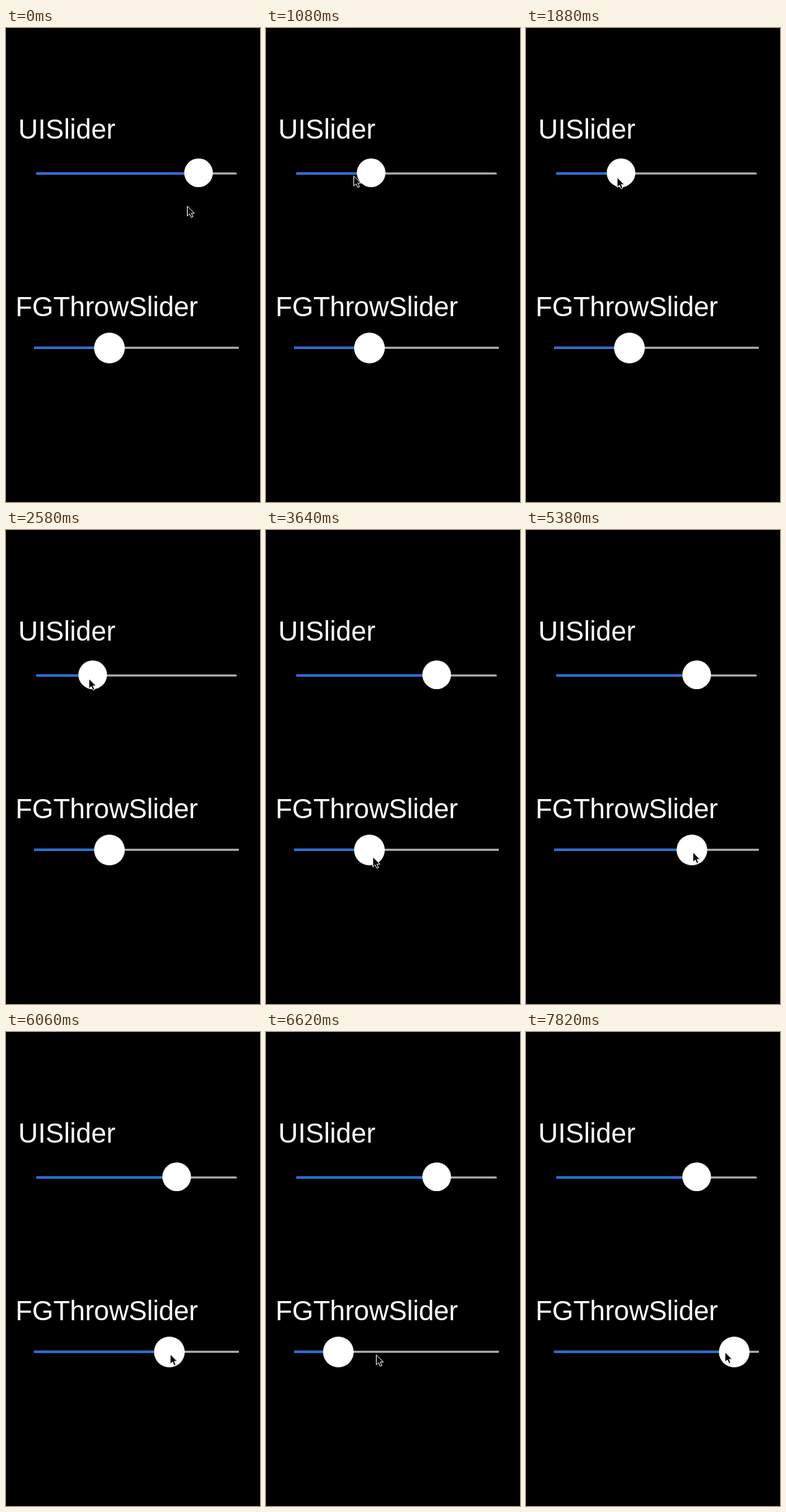
Recreate the animation shown at these times as an HTML page. Size 372 px wide and 694 px high, loop 8 s.

```html
<!DOCTYPE html>
<html lang="en">
<head>
<meta charset="utf-8">
<title>Sliders</title>
<style>
html, body { margin: 0; width: 100%; height: 100%; overflow: hidden; background: #000; }
svg { display: block; width: 372px; height: 694px; }
text { font: 40px "Liberation Sans", Arial, sans-serif; fill: #fff; }
.rest { fill: #b2b2b2; }
.done { fill: #1f6ff2; }
.thumb { fill: #fff; }
#cursor { fill: #000; stroke: #fff; stroke-linejoin: round; }
</style>
</head>
<body>
<svg viewBox="0 0 372 694">
  <text x="18" y="162.3">UISlider</text>
  <rect class="rest" x="44" y="211.5" width="294" height="3" rx="1.5"/>
  <rect class="done" id="fill1" x="44" y="211.5" height="3" rx="1.5"/>
  <circle class="thumb" id="thumb1" cy="212" r="21"/>

  <text x="14" y="421.8" letter-spacing="-0.15">FGThrowSlider</text>
  <rect class="rest" x="41" y="466.7" width="300" height="3"/>
  <rect class="done" id="fill2" x="41" y="466.7" height="3"/>
  <circle class="thumb" id="thumb2" cy="468.5" r="22.5"/>

  <path id="cursor" d="M.5 .8V15.2L3.9 12.1L6.3 17.4L8.8 16.3L6.5 11.2H10.9Z"/>
</svg>
<script>
const LOOP = 8000, STEP = 20;
const $ = id => document.getElementById(id);

const ease = {
  lin: p => p,
  in: p => p * p,
  out: p => 1 - (1 - p) ** 2,
  both: p => p * p * (3 - 2 * p)
};

// Pointer path: start, end, x, y at the end, easing. It rests between moves.
const start = [265, 260];
const moves = [
  [20, 380, 295, 217, 'both'],
  [520, 620, 291, 217, 'both'],
  [760, 1080, 128, 216, 'both'],
  [1080, 1180, 93, 216, 'out'],
  [1400, 1700, 148, 218, 'both'],
  [1760, 2060, 106, 218, 'both'],
  [2280, 2580, 121, 217, 'in'],
  [2580, 2780, 244, 218, 'both'],
  [2780, 3080, 234, 358, 'both'],
  [3100, 3400, 157, 481, 'both'],
  [3540, 3720, 155, 475, 'both'],
  [3740, 4320, 75.5, 472, 'both'],
  [4500, 4560, 73, 472, 'both'],
  [4560, 4700, 170, 472, 'in'],
  [4700, 4820, 189, 472, 'out'],
  [4980, 5180, 227.5, 472, 'both'],
  [5200, 5380, 244, 471, 'in'],
  [5380, 5720, 274, 471, 'out'],
  [5900, 6160, 185, 472, 'in'],
  [6160, 6280, 161, 472, 'out'],
  [6620, 6860, 110, 473, 'both'],
  [6900, 7180, 245, 470, 'in'],
  [7180, 7300, 286, 469, 'out'],
  [7760, 7820, 291, 467.5, 'lin']
];

function progress(t, a, b, kind) {
  return ease[kind](Math.min(1, Math.max(0, (t - a) / (b - a))));
}

function pointer(t) {
  let [x, y] = start;
  for (const [a, b, nx, ny, kind] of moves) {
    if (t < a) break;
    const p = progress(t, a, b, kind);
    x += (nx - x) * p;
    y += (ny - y) * p;
  }
  return [x, y];
}

// Follows the pointer while held and stops dead on release.
function plainThumb(t, x) {
  if (t < 760) return 282;
  if (t < 1400) return Math.max(154, x - 9);
  if (t < 1760) return 154;
  return t < 2780 ? x + 6 : 250;
}

// Keeps gliding after release: grab, release, pointer offset, glide end, rest place.
const throws = [
  [3740, 4700, -3.5, 4840, 226.5],
  [5200, 6160, -1, 6460, 106],
  [6900, 7180, -4, 7420, 305]
];

function throwThumb(t, x) {
  let pos = 151.5;
  for (const [grab, drop, off, end, rest] of throws) {
    if (t < grab) break;
    if (t < drop) return x + off;
    const from = pointer(drop)[0] + off;
    pos = from + (rest - from) * progress(t, drop, end, 'out');
  }
  return pos;
}

function setSlider(n, left, x) {
  $('thumb' + n).setAttribute('cx', x);
  $('fill' + n).setAttribute('width', x - left);
}

function draw(now) {
  const t = Math.floor((now % LOOP) / STEP) * STEP;
  const [x, y] = pointer(t);
  setSlider(1, 44, plainThumb(t, x));
  setSlider(2, 41, throwThumb(t, x));
  $('cursor').setAttribute('transform', `translate(${Math.round(x)} ${Math.round(y)})`);
}

function tick() {
  draw(performance.now());
  requestAnimationFrame(tick);
}
tick();
</script>
</body>
</html>
```
